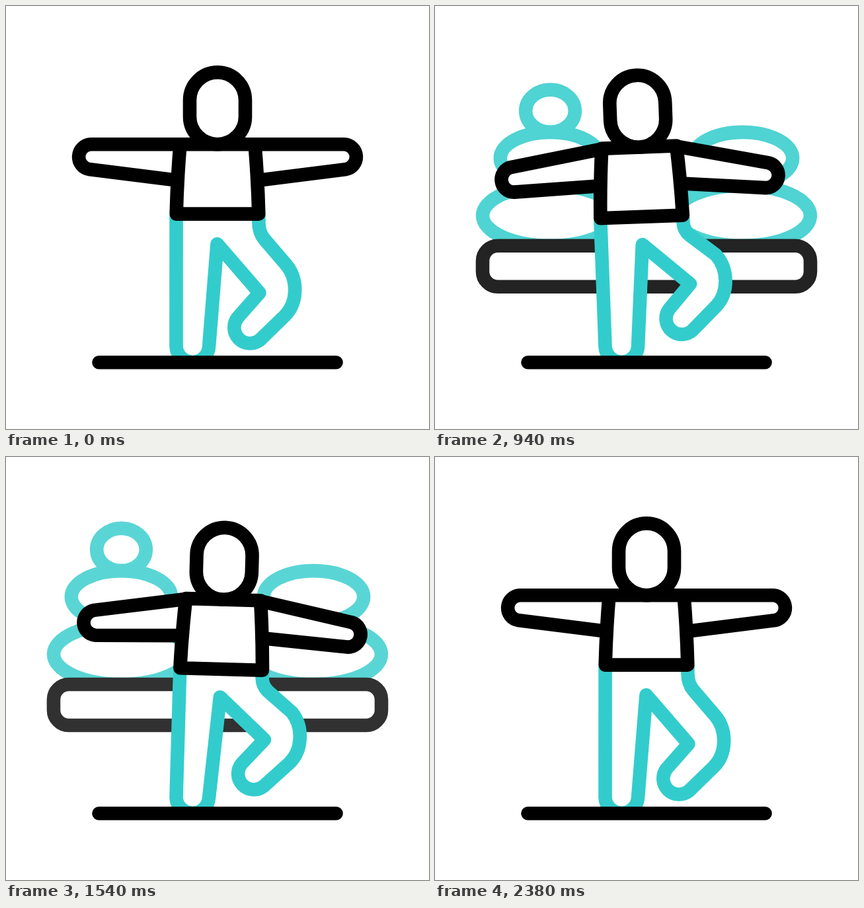
Animation of 640 by 640 pixels, one loop 2.4 s. Source, as an HTML page:

```html
<!DOCTYPE html>
<html lang="en">
<head>
<meta charset="utf-8">
<title>Balance pose</title>
<style>
  html, body { margin: 0; width: 100%; height: 100%; overflow: hidden; background: #fff; }
  svg { display: block; width: 100%; height: 100%; }
</style>
</head>
<body>
<svg viewBox="0 0 640 640" fill="#fff" stroke="#000" stroke-width="20.6" stroke-linejoin="round" stroke-linecap="round">
  <g id="stones">
    <g stroke="#3cc" fill="none">
      <ellipse cx="174.5" cy="167.4" rx="37.3" ry="32.1"/>
      <ellipse cx="174.5" cy="239" rx="75.7" ry="39.5"/>
      <ellipse cx="465.5" cy="239" rx="75.7" ry="39.5"/>
      <ellipse cx="174.5" cy="325.8" rx="102.4" ry="45.5"/>
      <ellipse cx="465.5" cy="325.8" rx="102.4" ry="45.5"/>
    </g>
    <rect x="72" y="371.4" width="496" height="62" rx="23"/>
  </g>
  <path id="legs" stroke="#3cc" stroke-linecap="butt"/>
  <path d="M140.5 539.2H499.5"/>
  <g id="body">
    <path id="armL" d="M270 209.2H128A19.1 19.1 0 0 0 125.5 247L258 263.7"/>
    <path id="armR" d="M370 209.2H512A19.1 19.1 0 0 1 514.5 247L382 263.7"/>
    <path d="M263.5 209.2H376.5Q381 262 382.3 314.6H257.7Q259 262 263.5 209.2Z"/>
    <rect x="278" y="100.4" width="84" height="108.8" rx="42"/>
  </g>
</svg>
<script>
const LOOP = 2400, FOOT = [282, 515], DROP = 6.4, OPACITY = 0.985;
const el = id => document.getElementById(id);
const set = (id, value, name = 'transform') => el(id).setAttribute(name, value);

// Eased interpolation through [time, value] keys
function track(t, keys) {
  let i = 1;
  while (i < keys.length - 1 && t > keys[i][0]) i++;
  const [t0, v0] = keys[i - 1], [t1, v1] = keys[i];
  const u = Math.min(1, Math.max(0, (t - t0) / (t1 - t0)));
  return v0 + (v1 - v0) * u * u * (3 - 2 * u);
}

// The standing foot stays put; everything else leans, and the raised leg lifts
function legsPath(tilt, bend) {
  const a = tilt * Math.PI / 180, c = Math.cos(a), s = Math.sin(a);
  const at = (x, y, dx = 0, dy = 0) => {
    const X = x - FOOT[0], Y = y - FOOT[1];
    return [FOOT[0] + X * c - Y * s + dx * bend, FOOT[1] + X * s + Y * c + dy * bend]
      .map(v => v.toFixed(2)).join(' ');
  };
  const knee = (x, y) => at(x, y, 6.4, -11.3);
  const shin = (x, y) => at(x, y, 6.2, -11.9);
  return [
    'M', at(382.4, 315, 0, DROP),
    'L', at(382.4, 327, 0, 4),
    'C', at(382.4, 338, 0, 2), at(385.5, 346.5, 0, -1), at(391, 353, 1, -2),
    'L', knee(424, 391.5),
    'C', knee(442, 413), knee(442, 449), knee(421.5, 469),
    'L', shin(384.5, 505),
    'A 24 24 0 0 1', shin(350.5, 471.5),
    'L', knee(383.5, 434),
    'L', at(319.5, 360, 0, 2.6),
    'L 307 516 A 24.8 24.8 0 0 1 257.5 515',
    'L', at(257.6, 315, 0, DROP)
  ].join(' ');
}

function draw(t) {
  const bend = track(t, [[0, 0], [1215, 1], [LOOP, 0]]);
  const tilt = track(t, [[0, 0], [800, -2.4], [1690, 1.95], [LOOP, 0]]);
  const rise = track(t, [[0, 8.7], [LOOP, -42.3]]);
  set('stones', `translate(0 ${rise})`);
  set('stones', OPACITY * bend, 'opacity');
  set('legs', legsPath(tilt, bend), 'd');
  set('body', `translate(0 ${DROP * bend}) rotate(${tilt} ${FOOT})`);
  set('armL', `rotate(${-10.6 * bend} 271 240)`);
  set('armR', `rotate(${14.1 * bend} 369 240)`);
}

const start = performance.now();
function tick() {
  draw((performance.now() - start) % LOOP);
  requestAnimationFrame(tick);
}
draw(0);
requestAnimationFrame(tick);
</script>
</body>
</html>
```
